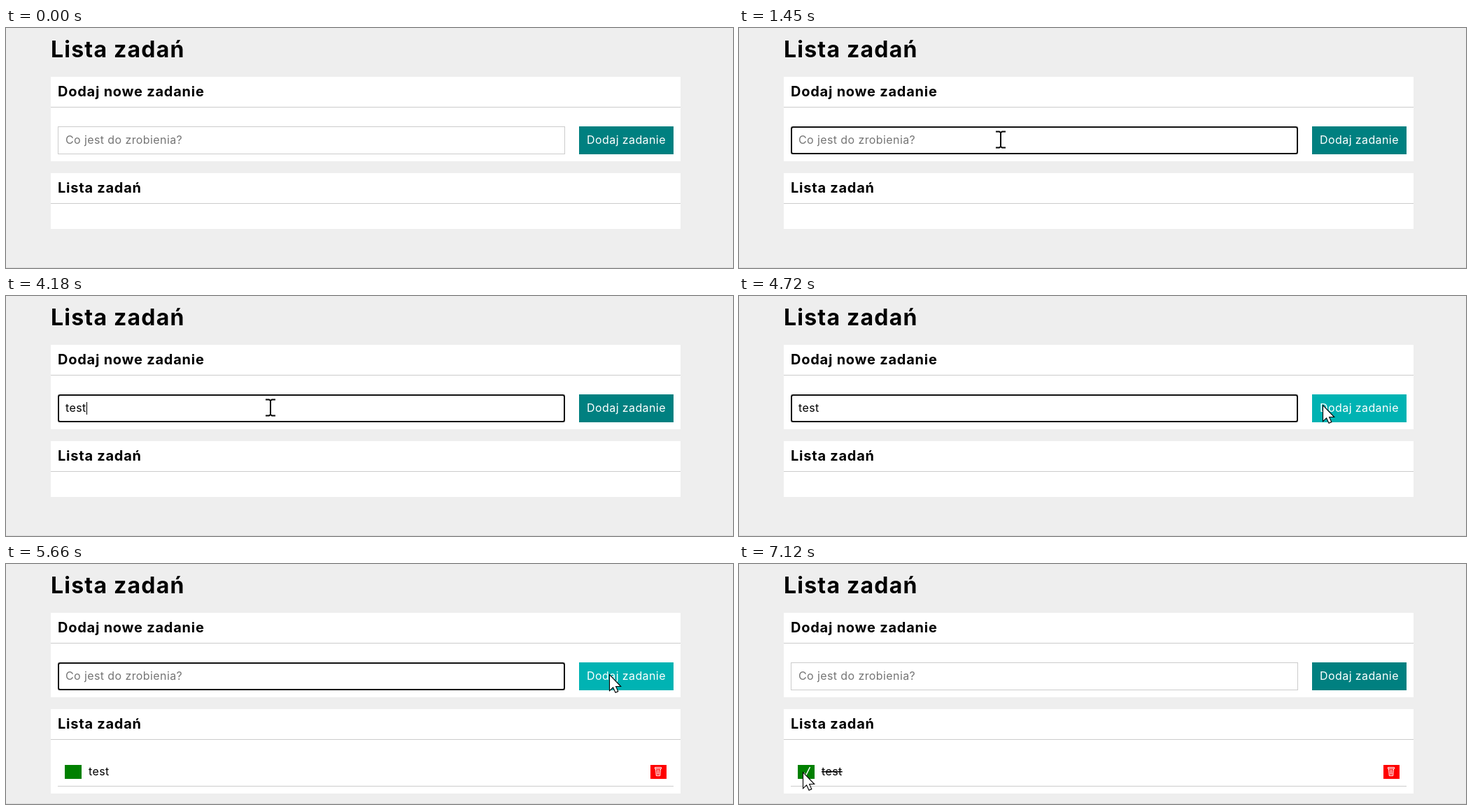
These frames come from a looping animation (1039 px wide and 344 px high, 8 s). An HTML page:

```html
<!DOCTYPE html>
<html lang="pl">
<head>
<meta charset="utf-8">
<title>Lista zadań</title>
<style>
  html, body { margin: 0; width: 100%; height: 100%; overflow: hidden; background: #eee; }
  svg { display: block; }
  text { font: 400 16px Inter, "Open Sans", sans-serif; letter-spacing: .025em; white-space: pre; }
  .h1, .h2 { font-weight: 700; letter-spacing: .038em; }
  .h1 { font-size: 32px; }
  .h2 { font-size: 20px; }
  .ring { fill: none; stroke: #101010; stroke-width: 2; }
  .done { text-decoration: line-through; }
</style>
</head>
<body>
<svg width="1039" height="344" viewBox="0 0 1039 344">
  <rect width="1039" height="344" fill="#eee"/>
  <rect y="343" width="1039" height="1" fill="#ddd"/>
  <text class="h1" x="64" y="42">Lista zadań</text>

  <rect x="64" y="70" width="900" height="121" fill="#fff"/>
  <text class="h2" x="74" y="98">Dodaj nowe zadanie</text>
  <rect x="64" y="113" width="900" height="1" fill="#ccc"/>
  <rect x="74.5" y="141.5" width="724" height="39" fill="#fff" stroke="#ccc"/>
  <rect id="inputRing" class="ring" x="75" y="142" width="723" height="38" rx="2.5"/>
  <text id="hint" x="85" y="166" fill="#757575">Co jest do zrobienia?</text>
  <text id="typed" x="85" y="166"></text>
  <rect id="caret" y="152" width="1" height="18"/>
  <rect id="button" x="819" y="141" width="135" height="40"/>
  <rect id="buttonRing" class="ring" x="819" y="141" width="135" height="40" rx="2.5"/>
  <text x="886.5" y="166" fill="#fff" text-anchor="middle">Dodaj zadanie</text>

  <rect id="panel" x="64" y="208" width="900" fill="#fff"/>
  <text class="h2" x="74" y="236">Lista zadań</text>
  <rect x="64" y="251" width="900" height="1" fill="#ccc"/>
  <g id="item">
    <rect x="84" y="288" width="24" height="20" fill="green"/>
    <path id="check" d="M92.5 299l3 4 6-12" fill="none" stroke="#fff" stroke-width="1.5"/>
    <rect id="checkRing" class="ring" x="84" y="288" width="24" height="20" rx="2.5"/>
    <text id="task" x="118" y="303">test</text>
    <rect x="921" y="288" width="23" height="20" fill="red"/>
    <path d="M927.5 293.5V291.5H936.5V293.5ZM928.5 293.5L929.3 303.5H934.7L935.5 293.5M931 295V302M933 295V302"
      fill="none" stroke="#fff"/>
    <rect x="74" y="318" width="880" height="1" fill="#ccc"/>
  </g>

  <path id="arrow" d="M.5.7V23.7L5.6 18.9 9 26.3 12.8 24.6 9.6 17.5H16.7Z" fill="#fff" stroke="#000" stroke-width="1.1"/>
  <path id="beam" d="M-7-11.5H-2L0-10 2-11.5H7M0-10.5V10.5M-7 11.5H-2L0 10 2 11.5H7" fill="none" stroke="#000" stroke-width="2"/>
  <circle id="click" r="18" fill="#ff0" fill-opacity=".5"/>
</svg>
<script>
const LOOP = 8000, STEP = 76;
const el = id => document.getElementById(id);
const show = (id, on) => el(id).setAttribute('visibility', on ? 'visible' : 'hidden');
const set = (id, attrs) => {
  for (const name in attrs) el(id).setAttribute(name, attrs[name]);
};
const within = (t, spans) => spans.some(([a, b]) => t >= a && t < b);

const easeOut = power => p => 1 - (1 - p) ** power;
const easeInOut = p => p * p * p * (p * (6 * p - 15) + 10);

// Each pointer move is a quadratic curve sampled in discrete steps.
const moves = [
  { t: 360, n: 7, path: [[430, 306], [385, 210], [374, 160]], ease: easeOut(2) },
  { t: 4180, n: 10, path: [[374, 160], [618, 138], [862, 158]], ease: easeInOut },
  { t: 5970, n: 11, path: [[862, 158], [300, 352], [96, 298]], ease: easeOut(2.16) },
  { t: 6810, n: 2, path: [[96, 298], [93, 298], [91, 298]], ease: p => p },
];
const keys = [2230, 2380, 2780, 3080];
const caretX = [85, 91, 101, 109, 115];
const caretOn = [[920, 1450], [2000, 3630], [4180, 4710], [5110, 5660], [6190, 6740]];
const inputFocus = [[920, 5040], [5110, 7040]];
const clicks = [[920, 990], [5040, 5110], [7040, 7120]];
const ADDED = 5110, DONE = 7120;

function pointer(t) {
  const move = moves.filter(m => t >= m.t).pop();
  if (!move) return null;
  const p = Math.min(1, (Math.floor((t - move.t) / STEP) + 1) / move.n);
  const s = move.ease(p), [a, b, c] = move.path;
  return [0, 1].map(i =>
    Math.round(a[i] * (1 - s) ** 2 + 2 * b[i] * s * (1 - s) + c[i] * s * s));
}

function draw(t) {
  const added = t >= ADDED, done = t >= DONE;
  const count = added ? 0 : keys.filter(k => t >= k).length;
  show('hint', !count);
  el('typed').textContent = 'test'.slice(0, count);
  set('caret', { x: caretX[count] });
  show('caret', within(t, caretOn));
  show('inputRing', within(t, inputFocus));
  show('buttonRing', within(t, [clicks[1]]));

  set('panel', { height: added ? 121 : 80 });
  el('item').style.display = added ? '' : 'none';
  show('check', done);
  show('checkRing', within(t, [clicks[2]]));
  el('task').classList.toggle('done', done);

  const pos = pointer(t), [x, y] = pos || [0, 0];
  const inRow = y >= 141 && y < 181;
  const overInput = inRow && x >= 74 && x < 799;
  const overButton = inRow && x >= 819 && x < 954;
  const transform = `translate(${x} ${y})`;
  set('button', { fill: overButton ? '#00b3b3' : '#008080' });
  for (const id of ['arrow', 'beam', 'click']) set(id, { transform });
  show('arrow', pos && !overInput);
  show('beam', pos && overInput);
  show('click', within(t, clicks));
}

const start = performance.now();
function tick() {
  draw((performance.now() - start) % LOOP);
  requestAnimationFrame(tick);
}
tick();
</script>
</body>
</html>
```
